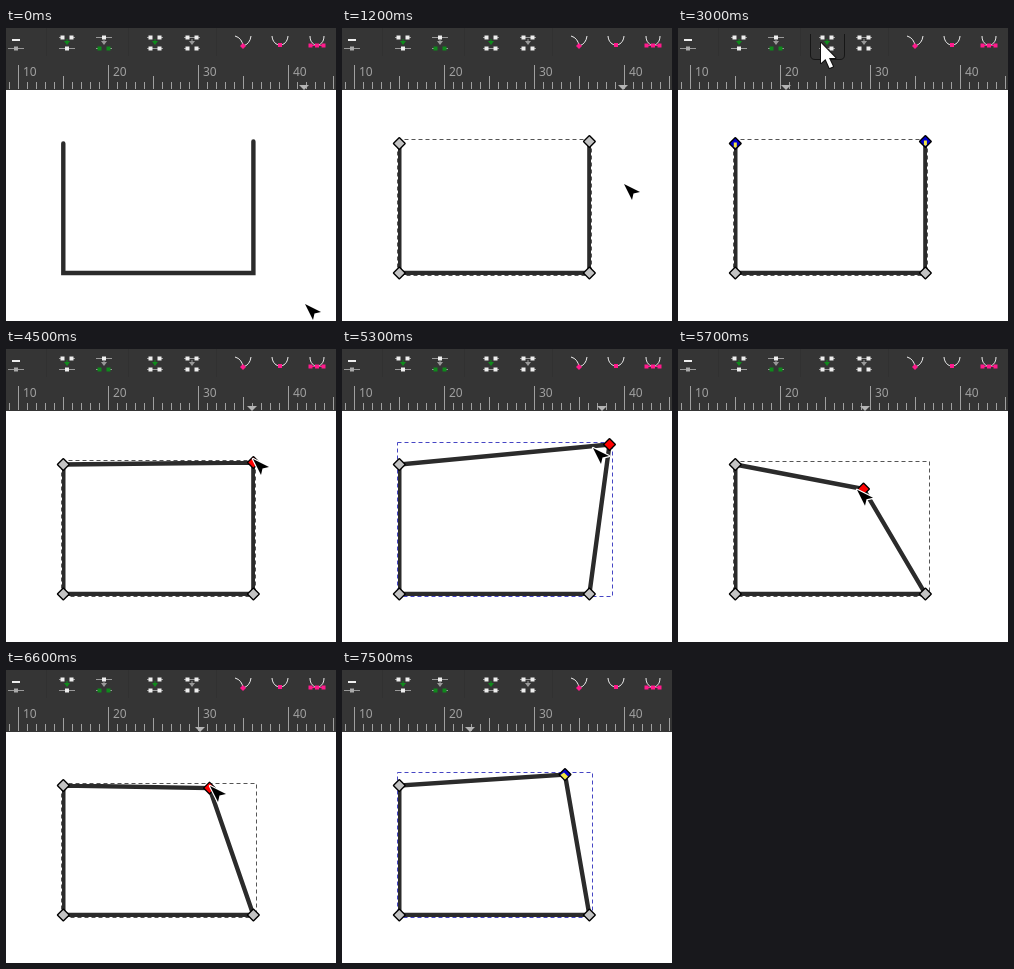
An HTML page with a canvas that plays this animation: 330x293 px, repeating every 7.8 s.

```html
<!DOCTYPE html>
<html lang="en">
<head>
<meta charset="utf-8">
<title>Joining and dragging path nodes</title>
<style>
  html, body { margin: 0; width: 100%; height: 100%; overflow: hidden; background: #fff; }
  canvas { display: block; }
</style>
</head>
<body>
<canvas id="stage" width="330" height="293"></canvas>
<script>
const ctx = document.getElementById('stage').getContext('2d');
const LOOP = 7800, STEP = 100, CANVAS_TOP = 62, HALF_STROKE = 2.2;
const PINK = '#ff1a8c', GREEN = '#0f8a1c', LIGHT = '#eee', DIM = '#999';

// Keys are [time, x, y].
const cursorKeys = [
  [100, 298, 275], [800, 247, 184], [900, 247, 184], [1100, 281, 156], [1200, 281, 155],
  [1300, 284, 150], [1400, 278, 148], [1700, 160, 119], [2000, 20, 84], [2300, 20, 84],
  [2650, 108, 64], [3000, 143, 15], [3200, 143, 15], [3700, 262, 115], [3900, 273, 111],
  [4300, 247, 111], [4400, 246, 109], [4500, 246, 109], [5100, 270, 93], [5200, 270, 93],
  [5300, 250, 98], [6000, 124, 171], [6100, 124, 171], [6200, 127, 167], [6700, 222, 102],
  [6900, 222, 102], [7150, 128, 64], [7400, 60, 6], [7500, 50, -40]
];
const nodeKeys = [
  [4500, 247.4, 113.5], [5100, 267.5, 95.5], [5300, 267.5, 95.5], [5400, 250, 104],
  [6000, 121, 176], [6100, 121, 176], [6200, 125.5, 172.5], [6700, 223, 104.5]
];

function at(keys, t) {
  const next = keys.findIndex(k => k[0] > t);
  if (next === 0) return keys[0].slice(1);
  if (next < 0) return keys[keys.length - 1].slice(1);
  const [t0, x0, y0] = keys[next - 1], [t1, x1, y1] = keys[next];
  const p = (t - t0) / (t1 - t0);
  return [x0 + (x1 - x0) * p, y0 + (y1 - y0) * p];
}

function rect(x, y, w, h, color) {
  ctx.fillStyle = color;
  ctx.fillRect(x, y, w, h);
}

function shape(d, { fill, stroke, width = 1, x = 0, y = 0 }) {
  const path = new Path2D(d);
  ctx.save();
  ctx.translate(x, y);
  ctx.lineWidth = width;
  ctx.lineJoin = 'round';
  if (stroke) { ctx.strokeStyle = stroke; ctx.stroke(path); }
  if (fill) { ctx.fillStyle = fill; ctx.fill(path); }
  ctx.restore();
}

const square = (x, y, color) => rect(x - 2, y - 2, 4, 4, color);

function arrowDown(x, color) {
  rect(x - 0.5, 11, 1, 4, color);
  shape('M-3 0H3L0 4Z', { fill: color, x, y: 13 });
}

function pair(x, y, color, joined) {
  rect(x - 8, y - 0.5, joined ? 16 : 5, 1, DIM);
  rect(x + 3, y - 0.5, 5, 1, DIM);
  square(x - 4.5, y, color);
  square(x + 4.5, y, color);
}

function single(x, y, color) {
  rect(x - 8, y - 0.5, 16, 1, DIM);
  square(x, y, color);
}

function drawToolbar(t) {
  rect(0, 0, 330, CANVAS_TOP, '#353535');
  for (const x of [40, 122, 210]) rect(x, 0, 1, 28, '#313131');
  if (t >= 3000 && t < 3500) {
    if (t >= 3200 && t < 3400) rect(133, 0, 33, 30, '#2b2b2b');
    shape('M132.5 6V27Q132.5 31.5 137 31.5H162Q166.5 31.5 166.5 27V6', { stroke: '#161616' });
  }
  rect(6, 11, 8, 2, LIGHT);
  rect(2, 20, 16, 1, DIM);
  square(10, 20.5, '#aaa');

  pair(61, 9.5, LIGHT);
  arrowDown(61, GREEN);
  single(61, 20.5, LIGHT);

  single(98, 9.5, LIGHT);
  arrowDown(98, DIM);
  pair(98, 20.5, GREEN);

  pair(149, 9.5, LIGHT);
  arrowDown(149, GREEN);
  pair(149, 20.5, LIGHT, true);

  pair(186, 9.5, LIGHT, true);
  arrowDown(186, DIM);
  pair(186, 20.5, LIGHT);

  shape('M229 8Q236 10 237 18Q244 16 245 8', { stroke: LIGHT });
  shape('M-3 0L0 -3L3 0L0 3Z', { fill: PINK, x: 237, y: 18 });
  shape('M266 8C267 20 281 20 282 8', { stroke: LIGHT });
  square(274, 17, PINK);
  shape('M304 8C304 20 318 20 318 8', { stroke: LIGHT });
  shape('M304 17.5H318', { stroke: PINK });
  for (const x of [304.5, 311, 317.5]) square(x, 17.5, PINK);
}

function drawRuler(markerX) {
  ctx.font = '12px "Noto Sans", "Open Sans", sans-serif';
  for (let unit = 9; unit <= 45; unit++) {
    const x = 12 + (unit - 10) * 9;
    const top = unit % 10 === 0 ? 37 : unit % 5 === 0 ? 48 : 54;
    rect(x, top, 1, 61 - top, '#a0a0a0');
    if (unit % 10 === 0) ctx.fillText(unit, x + 5, 48);
  }
  shape('M-5 0H5L0 5Z', { fill: '#b4b4b4', x: Math.round(markerX), y: 57 });
}

function trace(points, closed) {
  ctx.beginPath();
  points.forEach(p => ctx.lineTo(...p));
  if (closed) ctx.closePath();
}

// Bounds of the outline, including its mitred corners.
function strokeBounds(points) {
  const unit = (a, b) => {
    const d = Math.hypot(b[0] - a[0], b[1] - a[1]);
    return [(b[0] - a[0]) / d, (b[1] - a[1]) / d];
  };
  const tips = points.map((p, i) => {
    const u = unit(p, points[(i + 3) % 4]), v = unit(p, points[(i + 1) % 4]);
    const scale = HALF_STROKE / Math.max(0.1, Math.abs(u[0] * v[1] - u[1] * v[0]));
    const turn = u[0] * v[1] - u[1] * v[0];
    const side = turn > 0 ? 1 : -1;
    return [p[0] - side * (u[0] + v[0]) * scale, p[1] - side * (u[1] + v[1]) * scale];
  });
  const xs = tips.map(p => p[0]), ys = tips.map(p => p[1]);
  return [Math.min(...xs), Math.min(...ys), Math.max(...xs), Math.max(...ys)]
    .map(v => Math.floor(v) + 0.5);
}

function drawBounds(points) {
  const [x0, y0, x1, y1] = strokeBounds(points);
  ctx.lineWidth = 1;
  ctx.strokeStyle = '#fff';
  ctx.strokeRect(x0, y0, x1 - x0, y1 - y0);
  ctx.setLineDash([4, 3]);
  ctx.strokeStyle = y0 < 110 ? '#4646c4' : '#555';
  ctx.strokeRect(x0, y0, x1 - x0, y1 - y0);
  ctx.setLineDash([]);
}

function drawNode([x, y], state) {
  const fill = { plain: '#c3c3c3', active: '#f00' }[state] || '#0000c8';
  shape('M0 -5.5L5.5 0L0 5.5L-5.5 0Z', { stroke: '#000', width: 2, x, y });
  shape('M0 -5L5 0L0 5L-5 0Z', { fill, x, y });
  if (state === 'selected') shape('M-1.5 -1H1.5V3L0 4.5L-1.5 3Z', { fill: '#f0e640', x, y });
  if (state === 'released') shape('M-1 -2L3 2L0 5L-4.5 .5Z', { fill: '#f0e640', x, y });
}

function drawPath(t) {
  const moving = at(nodeKeys, t);
  const corners = [[57.3, 115.5], [57.3, 245], [247.4, 245], moving];
  trace(corners, t >= 3300);
  ctx.lineCap = 'round';
  ctx.lineJoin = 'miter';
  ctx.lineWidth = HALF_STROKE * 2;
  ctx.strokeStyle = '#2b2b2b';
  ctx.stroke();
  ctx.lineCap = 'butt';

  if (t < 1000) {
    if (t >= 800) {
      ctx.lineWidth = 1;
      ctx.strokeStyle = '#f00';
      ctx.stroke();
    }
    return;
  }
  drawBounds(corners);
  const selected = t >= 2300 && t < 3900;
  const movingState = selected ? 'selected'
    : t >= 7000 ? 'released'
    : t >= 4200 ? 'active' : 'plain';
  drawNode(corners[0], selected ? 'selected' : 'plain');
  drawNode(corners[1], 'plain');
  drawNode(corners[2], 'plain');
  drawNode(moving, movingState);
}

function drawCursor(x, y) {
  if (y < CANVAS_TOP) {
    shape('M0 0V20L4.5 16L8.5 25L12 23.5L8 15H14.5Z',
      { fill: '#fff', stroke: '#111', width: 2, x, y });
  } else {
    shape('M1 1L17 9L10.5 10.5L9 17Z', { fill: '#000', stroke: '#fff', width: 2.4, x, y });
  }
}

// The ruler marker trails slightly and stays put while the pointer is off the page.
function markerPosition(t) {
  let time = t - STEP / 2;
  while (time > 0 && at(cursorKeys, time)[1] < CANVAS_TOP) time -= STEP;
  return at(cursorKeys, time)[0];
}

function draw(t) {
  rect(0, 0, 330, 293, '#fff');
  drawPath(t);
  const cursor = at(cursorKeys, t);
  if (t >= 1400 && t < 2300) {
    ctx.lineWidth = 1;
    ctx.strokeStyle = '#808080';
    const [x, y] = cursor.map(Math.round);
    ctx.strokeRect(x + 0.5, y + 0.5, 284 - x, 150 - y);
  }
  drawToolbar(t);
  drawRuler(markerPosition(t));
  drawCursor(...cursor);
}

function frame() {
  draw(Math.floor(performance.now() % LOOP / STEP) * STEP);
  requestAnimationFrame(frame);
}
frame();
</script>
</body>
</html>
```
